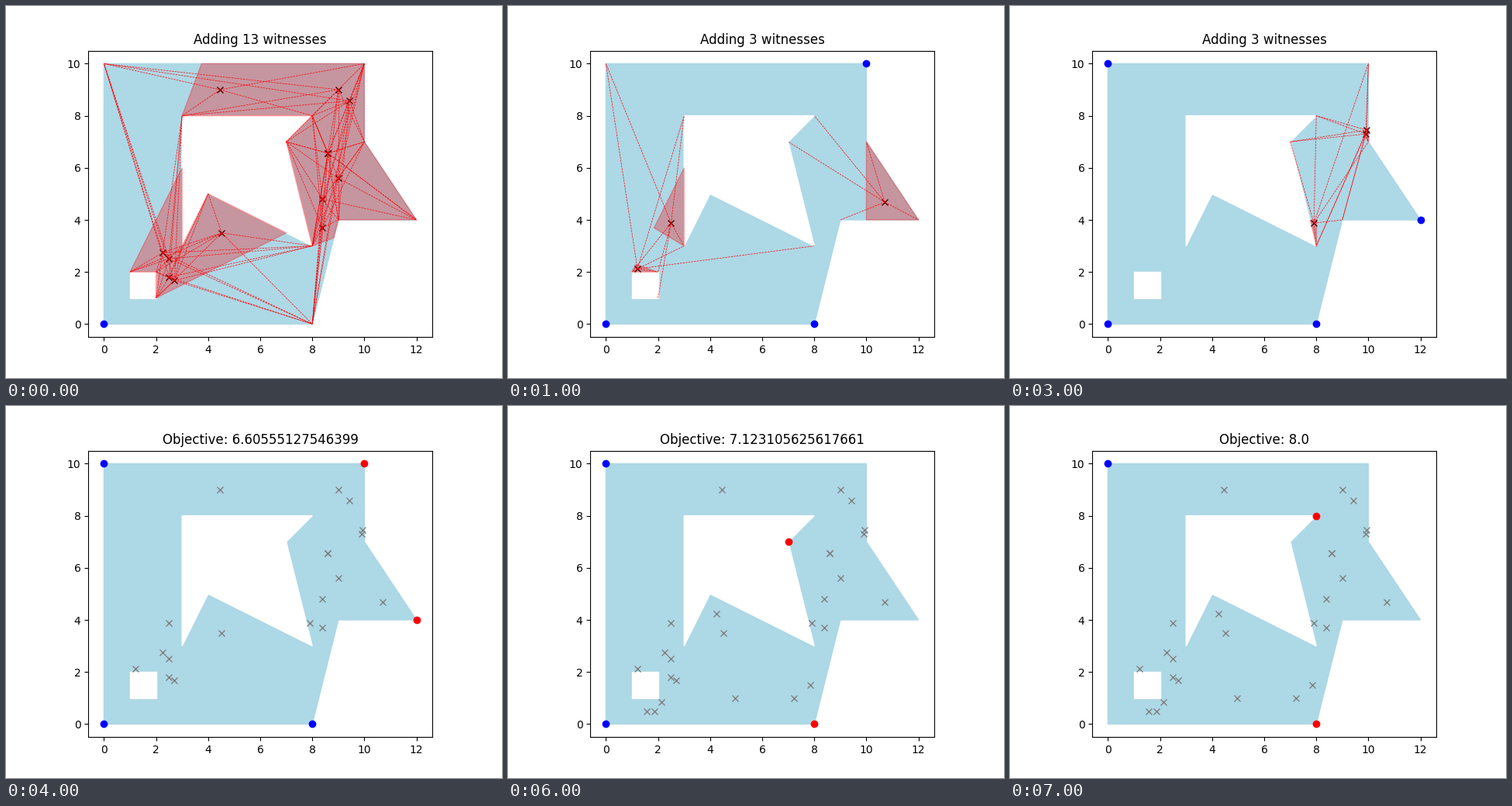
A matplotlib script that plays this animation: 640x480 px, repeating every 8 s.

```python
import matplotlib.pyplot as plt
from matplotlib.animation import FuncAnimation

# Corners are named by letters: room A-G, small hole h-k, large hole l-q
CORNERS = dict(
    A=(0, 0), B=(8, 0), C=(9, 4), D=(12, 4), E=(10, 7), F=(10, 10), G=(0, 10),
    h=(1, 1), i=(1, 2), j=(2, 2), k=(2, 1),
    l=(3, 3), m=(4, 5), n=(8, 3), o=(7, 7), p=(8, 8), q=(3, 8))
ROOM, *HOLES = RINGS = ["ABCDEFG", "hijk", "lmnopq"]
EDGES = [(CORNERS[a], CORNERS[b])
         for ring in RINGS for a, b in zip(ring, ring[1:] + ring[0])]

# Each round: guards, uncovered regions, new witnesses.
# In a region, "AqFG" is the point where line A-q meets line F-G.
ROUNDS = [
    ("A",
     ["AqFG F E D C AnBC n o p q", "i Ailq l m Akmn k j"],
     [(4.46, 9), (9, 9), (9.43, 8.57), (8.6, 6.56), (8.6, 6.56), (9, 5.6),
      (8.39, 4.8), (8.39, 3.7), (2.25, 2.74), (2.5, 2.51), (2.5, 1.8),
      (2.71, 1.67), (4.52, 3.5)]),
    ("ABF",
     ["E D EFCD", "Ailq l AiBl", "i AiBj j"],
     [(1.21, 2.12), (2.5, 3.88), (10.71, 4.68)]),
    ("ABDG",
     ["E EFGp BCGp BCDE", "n BnCD onCD"],
     [(9.94, 7.45), (9.9, 7.3), (7.91, 3.88)]),
    ("Goi",
     ["l m ilmn", "Glij onij onBC B GlAB", "h GhAB GjAB j k"],
     [(4.25, 4.24), (4.96, 1), (7.22, 1), (7.86, 1.5), (1.58, 0.49),
      (1.87, 0.49), (2.14, 0.84)]),
]

# Each solution: objective, guards, closest pair, witness rounds so far
SOLUTIONS = [
    ("1.0", "".join(RINGS), "jk", 2),
    ("6.60555127546399", "ABG", "FD", 3),
    ("7.123105625617661", "AG", "Bo", 4),
    ("8.0", "G", "Bp", 4),
]

fig, ax = plt.subplots(figsize=(6.4, 4.8), dpi=100)


def side(a, b, c):
    return (b[0] - a[0]) * (c[1] - a[1]) - (b[1] - a[1]) * (c[0] - a[0])


def crosses(p, q, a, b):
    eps = 1e-9
    return (side(p, q, a) * side(p, q, b) < -eps
            and side(a, b, p) * side(a, b, q) < -eps)


def sees(p, q):
    return not any(crosses(p, q, a, b) for a, b in EDGES)


def locate(name):
    if len(name) == 1:
        return CORNERS[name]
    a, b, c, d = (CORNERS[s] for s in name)
    u, v = side(c, d, a), side(c, d, b)
    t = u / (u - v)
    return a[0] + t * (b[0] - a[0]), a[1] + t * (b[1] - a[1])


def fill(names, **style):
    ax.fill(*zip(*map(locate, names)), **style)


def dots(points, marker, color):
    ax.plot(*zip(*points), marker, color=color)


def guard_dots(names, color):
    dots([CORNERS[s] for s in names], "o", color)


def draw_room():
    ax.clear()
    ax.set_aspect("equal")
    ax.set_xlim(-0.6, 12.6)
    ax.set_ylim(-0.5, 10.5)
    ax.set_xticks(range(0, 13, 2))
    ax.set_yticks(range(0, 11, 2))
    fill(ROOM, color="lightblue")
    for hole in HOLES:
        fill(hole, color="white")


def draw_round(guards, regions, witnesses):
    for region in regions:
        fill(region.split(), color="red", alpha=0.3)
    dots(witnesses, "x", (0.3, 0, 0))
    for w in witnesses:
        for c in CORNERS.values():
            if sees(w, c):
                ax.plot(*zip(w, c), "--", color="red", lw=0.5)
    guard_dots(guards, "blue")
    ax.set_title(f"Adding {len(witnesses)} witnesses")


def draw_solution(objective, guards, pair, count):
    for _, _, witnesses in ROUNDS[:count]:
        dots(witnesses, "x", "gray")
    guard_dots(guards, "blue")
    guard_dots(pair, "red")
    ax.set_title(f"Objective: {objective}")


STEPS = [(draw_round, r) for r in ROUNDS]
STEPS[2:2] = [(draw_solution, SOLUTIONS[0])]
STEPS[4:4] = [(draw_solution, SOLUTIONS[1])]
STEPS += [(draw_solution, s) for s in SOLUTIONS[2:]]


def update(i):
    draw_room()
    draw, data = STEPS[i]
    draw(*data)
    return []


anim = FuncAnimation(fig, update, frames=len(STEPS), interval=1000,
                     init_func=lambda: [], repeat=True, repeat_delay=0)
plt.show()
```
